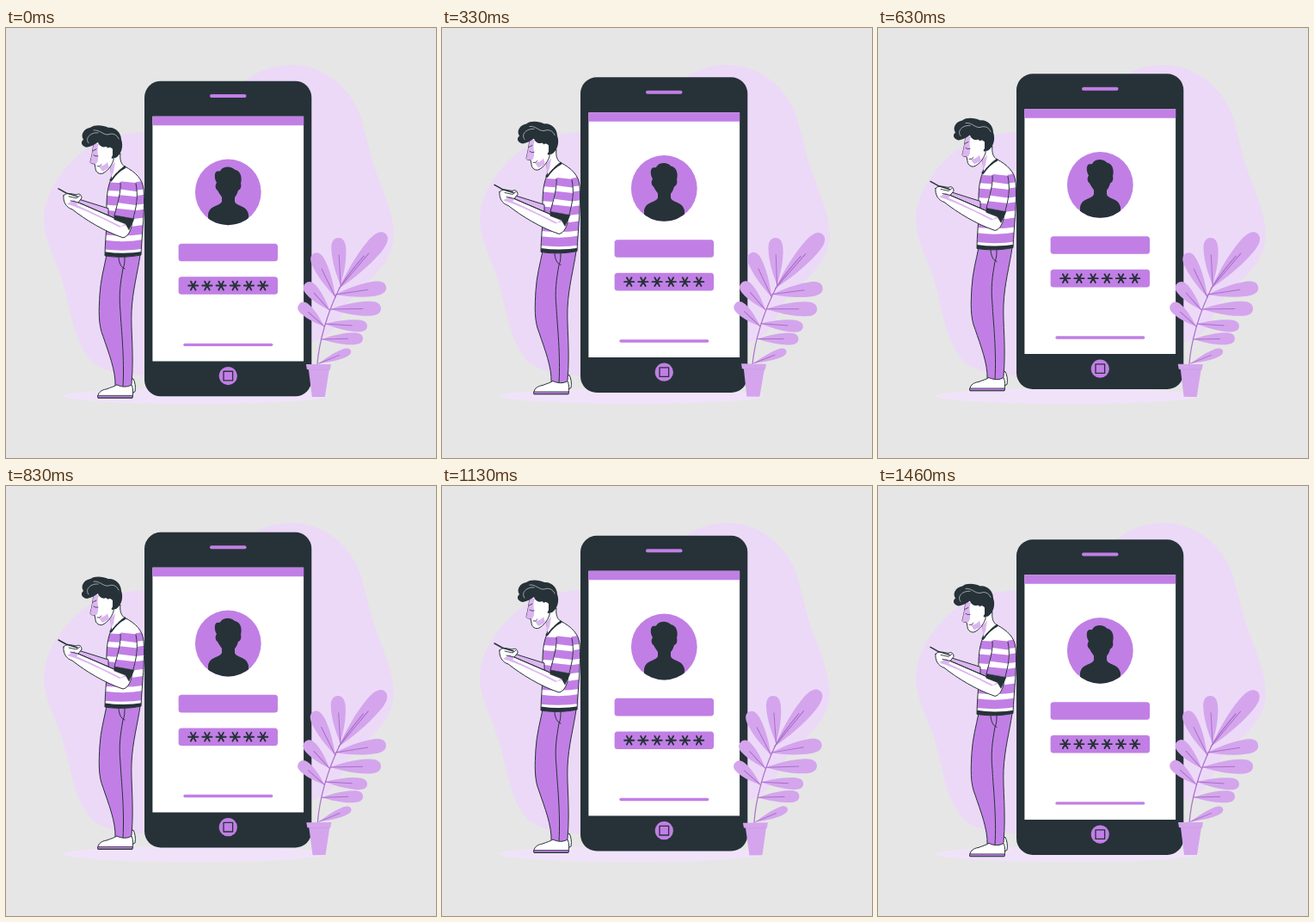
Recreate the animation shown at these times as an HTML page with a canvas. Size 500 px wide and 500 px high, loop 1.5 s.

```html
<!DOCTYPE html>
<html lang="en">
<head>
<meta charset="utf-8">
<title>Login</title>
<style>
html, body { margin: 0; width: 100%; height: 100%; overflow: hidden; background: #e6e6e6; }
canvas { display: block; width: 500px; height: 500px; }
</style>
</head>
<body>
<canvas id="stage"></canvas>
<script>
const SIZE = 500, LOOP = 1500, LEAD = 40;
const BACK = '#e6e6e6', PURPLE = '#c17fe5', DARK = '#263238', WHITE = '#fff';
const BLOB = '#ecd9f7', LEAF = '#d4a5ed', VEIN = '#a96fca', SHADE = '#dcb5f1';

const canvas = document.getElementById('stage');
const ctx = canvas.getContext('2d');
const ratio = window.devicePixelRatio || 1;
canvas.width = canvas.height = SIZE * ratio;

function fill(d, color) {
  ctx.fillStyle = color;
  ctx.fill(new Path2D(d));
}

function line(d, width = 1, color = DARK) {
  ctx.strokeStyle = color;
  ctx.lineWidth = width;
  ctx.stroke(new Path2D(d));
}

function shape(d, color, width = 1) {
  fill(d, color);
  line(d, width);
}

function box(x, y, w, h, r, color) {
  ctx.fillStyle = color;
  ctx.beginPath();
  ctx.roundRect(x, y, w, h, r);
  ctx.fill();
}

function oval(x, y, rx, ry, color) {
  ctx.fillStyle = color;
  ctx.beginPath();
  ctx.ellipse(x, y, rx, ry, 0, 0, Math.PI * 2);
  ctx.fill();
}

function clipped(d, draw) {
  ctx.save();
  ctx.clip(new Path2D(d));
  draw();
  ctx.restore();
}

function backdrop() {
  fill(`M166 121 C140 121 112 128 93 141 C70 158 46 188 44 219 C43 247 59 270 66 296
    C75 330 80 362 95 382 C105 397 127 402 155 404 C230 407 290 377 355 366
    C386 358 388 333 402 313 C420 293 450 276 451 241 C450 212 436 185 428 161
    C417 126 416 100 399 78 C382 54 355 42 329 43 C292 45 277 61 258 82
    C235 107 200 122 166 121 Z`, BLOB);
  oval(220, 428, 153, 9.2, '#f0e3f9');
}

function asterisk(x, y) {
  let d = '';
  for (let i = 0; i < 3; i++) {
    const a = i * Math.PI / 3;
    const dx = 5.6 * Math.cos(a), dy = 5.6 * Math.sin(a);
    d += `M${x - dx} ${y - dy}L${x + dx} ${y + dy}`;
  }
  line(d, 1.9);
}

function avatar() {
  oval(258.3, 191, 38.4, 38.4, PURPLE);
  clipped('M219.9 191 a38.4 38.4 0 1 1 76.8 0 a38.4 38.4 0 1 1 -76.8 0Z', () => {
    fill(`M245 180 C242 176 242 168 245 167 C248 166 248 168 250 165 C254 160 263 161 266 165
      C272 166 275 172 273 181 C274 184 273 188 270 189 C269 193 267 196 266 197 L266 202
      C268 208 280 206 282 217 L282 232 L235 232 L235 217 C237 206 248 208 251 202
      L251 197 C249 194 247 191 246 189 C243 187 243 183 245 180 Z`, DARK);
  });
}

function phone() {
  box(161, 61.8, 194.3, 366.7, 19, DARK);
  box(237, 77.2, 42.5, 4, 2, PURPLE);
  box(170.4, 102.8, 175.7, 284.8, 0, WHITE);
  box(170.4, 102.8, 175.7, 10.5, 0, PURPLE);
  avatar();
  box(200.6, 250.8, 115.4, 20.6, 3.5, PURPLE);
  box(200.6, 289.4, 115.4, 20.6, 3.5, PURPLE);
  for (let i = 0; i < 6; i++) asterisk(217.7 + 16.2 * i, 299.7);
  box(206.3, 366.8, 104, 3.4, 1.7, PURPLE);
  oval(258.3, 404.7, 10.6, 10.6, PURPLE);
  line('M253 399.4h10.6v10.6h-10.6Z', 1.3);
}

function legs() {
  shape('M136 412 L148 408 C150 412 151 417 150 423 L146 425 L137 423 Z', WHITE);
  shape(`M117 264 L156 264 C153 285 147 306 146 330 C145 352 149 379 146 414
    L144 419 C138 421 131 420 127 417 C128 399 119 377 113 359 C107 345 108 328 109 310
    C110 293 114 279 117 264 Z`, PURPLE);
  line('M131 266 C131 273 134 279 138 280 M138 266 C138 271 138 276 136 280 C133 297 131 310 133 330 C134 350 138 385 136 417');
  shape(`M107 430 C106 425 110 421 117 420 C122 418 126 417 129 415 C135 418 141 418 146 415
    C148 419 148 425 147 430 Z`, WHITE);
  shape('M107 427.5 H147.5 L147 430 H107 Z', PURPLE, 0.8);
}

const SHIRT = `M122 176 L138 161 C151 168 159 176 160 188 C162 210 158 238 157 264
  C143 267 128 267 115 265 C115 250 117 237 117 222 C117 206 116 190 122 176 Z`;

function shirt() {
  fill(SHIRT, WHITE);
  clipped(SHIRT, () => {
    for (const [y, h] of [[178, 10], [194, 11], [211, 10], [229, 11], [246, 11]])
      fill(`M110 ${y} Q139 ${y + 5} 165 ${y - 1} V${y + h - 1} Q139 ${y + h + 4} 110 ${y + h} Z`, PURPLE);
    fill('M112 260 Q136 264 160 260 V270 H112 Z', DARK);
  });
  line(SHIRT);
  line('M122 177 C126 171 132 165 138 162', 3);
}

function arms() {
  shape('M84 199 L119 210 L119 218 L80 205 Z', SHADE);
  shape(`M67 195 C70 191 76 193 82 194 C85 192 88 194 88 198 L84 203
    L128 222 L147 224 C146 235 142 243 136 244 C115 237 92 223 77 211
    C70 209 66 202 67 195 Z`, WHITE);
  fill('M71 205 C91 211 114 223 132 232 L141 229 L128 223 L84 204 L79 200 Z', SHADE);
  fill('M82 206 C101 215 119 223 134 231 L138 228 L128 223 L84 204 Z', WHITE);
  line('M84 203 L128 222 M73 196 L82 198 L86 195 M75 201 L84 203', 0.9);
  line('M61 187 L70 192 L83 196', 1.5);

  const sleeve = `M139 168 C131 174 134 190 130 201 L125 219 L147 226
    C151 213 154 202 152 188 C151 176 147 167 139 168 Z`;
  fill(sleeve, WHITE);
  clipped(sleeve, () => {
    for (const y of [178, 194, 210])
      fill(`M120 ${y - 1} L158 ${y + 3} V${y + 13} L120 ${y + 8} Z`, PURPLE);
  });
  line('M133 180 C134 190 130 203 126 218 M147 225 C152 207 154 196 151 181');
  shape('M126 218 L149 222 L143 235 L139 228 L126 223 Z', DARK, 0.5);
}

function head() {
  shape('M120 149 L133 146 C132 153 134 159 138 161 C133 164 126 171 122 177 C123 171 123 167 121 162 Z', WHITE);
  fill('M121 162 L127 156 L125 168 L122 174 Z', SHADE);
  const face = `M102 133 C101 143 100 148 98 156 C98 158 101 158 103 158 L104 163
    C104 168 109 171 113 169 C118 166 122 162 125 154 L126 132 Z`;
  shape(face, WHITE);
  clipped(face, () => {
    fill('M100 134 L108 135 C104 144 110 152 105 158 L97 158 Z', SHADE);
    fill('M107 160 C110 162 115 160 118 156 L120 163 L112 167 Z', SHADE);
  });
  line('M101 143 L105 141 M102 148 Q104 150 107 149 M106 161 Q109 162 111 159', 0.8);
  fill(`M94 139 C88 138 86 133 90 130 C86 124 91 117 98 116 C103 112 113 113 119 116
    C127 115 134 122 134 130 C137 138 134 147 128 151 L123 152 L121 144
    C119 140 118 139 116 138 C113 140 108 137 107 133 C103 136 99 138 94 139 Z`, DARK);
  fill('M124 141 C119 136 116 141 118 147 C119 151 123 152 124 148 Z', WHITE);
  line('M96 134 C91 128 99 121 107 122 M102 119 C109 118 113 125 119 124 C124 122 129 124 131 129', 0.7, '#d3d6d8');
}

function man() {
  legs();
  shirt();
  arms();
  head();
}

function leaf(x, y, tipX, tipY, w) {
  const len = Math.hypot(tipX - x, tipY - y), h = w / 2;
  ctx.save();
  ctx.translate(x, y);
  ctx.rotate(Math.atan2(tipY - y, tipX - x));
  ctx.beginPath();
  ctx.moveTo(0, 0);
  ctx.bezierCurveTo(0.2 * len, -h * 0.45, 0.48 * len, -h, 0.76 * len, -h);
  ctx.bezierCurveTo(0.93 * len, -h, len, -h * 0.6, len, 0);
  ctx.bezierCurveTo(len, h * 0.6, 0.93 * len, h, 0.76 * len, h);
  ctx.bezierCurveTo(0.48 * len, h, 0.2 * len, h * 0.45, 0, 0);
  ctx.fillStyle = LEAF;
  ctx.fill();
  line(`M0 0 L${0.64 * len} 0`, 1, VEIN);
  ctx.restore();
}

const LEAVES = [
  [387, 303, 441, 239, 20], [389, 299, 386, 244, 17], [383, 313, 358, 262, 16],
  [376, 328, 348, 297, 15], [370, 347, 341, 321, 14], [383, 310, 442, 301, 17],
  [377, 327, 436, 326, 17], [371, 344, 420, 347, 14], [367, 362, 415, 361, 14],
  [364, 390, 401, 375, 10]
];

function plant() {
  for (const args of LEAVES) leaf(...args);
  line('M362 392 C364 364 374 330 388 302 C395 290 404 279 416 265', 1.2, VEIN);
  fill('M349 391 H378 L377 397 H376 L371 429 H356 L352 397 H350 Z', LEAF);
  line('M352 397.3 H376', 0.6, '#c796e4');
}

function around(x, y, angle, draw) {
  ctx.save();
  ctx.translate(x, y);
  ctx.rotate(angle);
  ctx.translate(-x, -y);
  draw();
  ctx.restore();
}

// Triangle wave: 0, 1, 0, -1, 0 over one period
const triangle = p => p < 0.25 ? 4 * p : p < 0.75 ? 2 - 4 * p : 4 * p - 4;

function render(now) {
  const p = ((now + LEAD) % LOOP) / LOOP;
  ctx.setTransform(ratio, 0, 0, ratio, 0, 0);
  ctx.lineCap = ctx.lineJoin = 'round';
  ctx.fillStyle = BACK;
  ctx.fillRect(0, 0, SIZE, SIZE);
  backdrop();
  ctx.save();
  ctx.translate(0, 0.4 - 10 * (1 - Math.abs(1 - 2 * p)));
  phone();
  man();
  ctx.restore();
  around(391, 333, triangle(p) * Math.PI / 180, plant);
}

const start = performance.now();
function tick() {
  render(performance.now() - start);
  requestAnimationFrame(tick);
}
tick();
</script>
</body>
</html>
```
